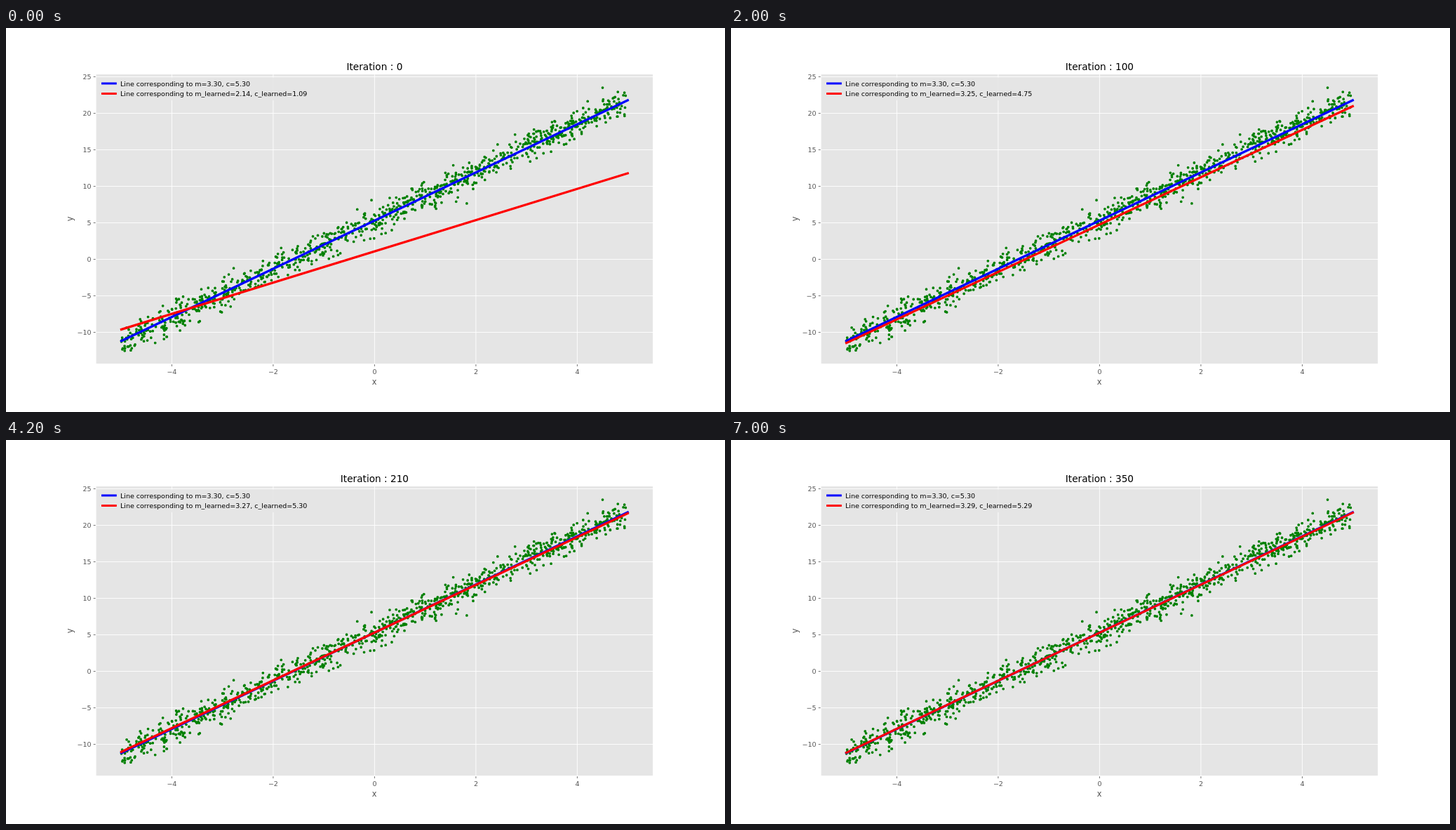
Animation of 1025x547 px, one loop 7200 ms. Source, as an HTML page with a canvas:

```html
<!DOCTYPE html>
<html lang="en">
<head>
<meta charset="utf-8">
<title>Line fit</title>
<style>
  html, body { margin: 0; width: 100%; height: 100%; overflow: hidden; background: #fff; }
  canvas { display: block; }
</style>
</head>
<body>
<canvas id="stage" width="1025" height="547"></canvas>
<script>
const ctx = document.getElementById('stage').getContext('2d');
const STEP = 200, STEPS = 36;
const BOX = { left: 128.1, right: 922.5, top: 65.6, bottom: 478.6 };
const M = 3.3, C = 5.3, LOW = -12.53, HIGH = 23.57, X_MAX = 4.995;
const toX = x => 525.4 + x * 72.25;

// Key fits: iteration, slope, intercept
const fits = [
  [0, 2.14, 1.09], [20, 3.24, 2.5], [60, 3.3, 4.06], [140, 3.19, 5.06],
  [210, 3.27, 5.3], [280, 3.25, 5.24], [350, 3.29, 5.29]
];
const decay = n => [M - 1.16 * Math.exp(-0.17 * n), C - 4.21 * Math.exp(-0.0204 * n)];

// Exponential descent plus the drift interpolated between key fits
function fitAt(n) {
  let i = 0;
  while (i < fits.length - 2 && n > fits[i + 1][0]) i++;
  const a = fits[i], b = fits[i + 1], k = (n - a[0]) / (b[0] - a[0]);
  const da = decay(a[0]), db = decay(b[0]);
  return decay(n).map((v, j) => v + (a[j + 1] - da[j]) * (1 - k) + (b[j + 1] - db[j]) * k);
}

let seed = 7;
function random() {
  seed = (seed * 16807) % 2147483647;
  return seed / 2147483647;
}
const gauss = () => Math.sqrt(-2 * Math.log(random())) * Math.cos(2 * Math.PI * random());

// A few clear strays, then normal noise around the line
const dots = [[4.5, 23.5], [-4.93, LOW], [-0.06, 8.1], [1.61, 7.9], [1.82, 7.65]];
while (dots.length < 1000) {
  const x = (random() * 2 - 1) * X_MAX, noise = gauss(), y = M * x + C + noise;
  if (Math.abs(noise) < 2.7 && y > LOW && y < 23) dots.push([x, y]);
}

function line(x1, y1, x2, y2, color, width, cap = 'butt') {
  ctx.strokeStyle = color;
  ctx.lineWidth = width;
  ctx.lineCap = cap;
  ctx.beginPath();
  ctx.moveTo(x1, y1);
  ctx.lineTo(x2, y2);
  ctx.stroke();
}

function text(str, x, y, size, align, color) {
  ctx.font = size + 'px "DejaVu Sans", sans-serif';
  ctx.textAlign = align;
  ctx.fillStyle = color;
  ctx.fillText(str, x, y);
}

const label = v => String(v).replace('-', '\u2212');

function legendRow(y, color, str) {
  line(137.5, y, 156.3, y, color, 3, 'square');
  text('Line corresponding to ' + str, 163, y + 3.5, 9.5, 'left', '#000');
}

function draw(n) {
  const [m, c] = fitAt(n);
  const low = Math.min(LOW, c - 5 * m), range = HIGH - low;
  const width = BOX.right - BOX.left, height = BOX.bottom - BOX.top;
  const unit = height / (range * 1.1);
  const toY = y => BOX.top + (HIGH + range * 0.05 - y) * unit;

  ctx.fillStyle = '#fff';
  ctx.fillRect(0, 0, 1025, 547);
  ctx.fillStyle = '#e5e5e5';
  ctx.fillRect(BOX.left, BOX.top, width, height);

  for (let v = -4; v <= 4; v += 2) {
    const x = toX(v);
    line(x, BOX.top, x, BOX.bottom, '#fff', 0.9);
    line(x, BOX.bottom, x, BOX.bottom + 3.4, '#555', 0.8);
    text(label(v), x, 493, 9.5, 'center', '#555');
  }
  for (let v = -15; v <= 25; v += 5) {
    const y = toY(v);
    if (y > BOX.bottom) continue;
    line(BOX.left, y, BOX.right, y, '#fff', 0.9);
    line(BOX.left - 3.4, y, BOX.left, y, '#555', 0.8);
    text(label(v), 121.5, y + 3.5, 9.5, 'right', '#555');
  }

  ctx.fillStyle = '#008000';
  ctx.beginPath();
  for (const [x, y] of dots) {
    const px = toX(x), py = toY(y);
    ctx.moveTo(px + 1.9, py);
    ctx.arc(px, py, 1.9, 0, 2 * Math.PI);
  }
  ctx.fill();

  const fitLine = (a, b, color) =>
    line(toX(-X_MAX), toY(b - X_MAX * a), toX(X_MAX), toY(b + X_MAX * a), color, 3.3, 'square');
  fitLine(M, C, '#00f');
  fitLine(m, c, '#f00');

  ctx.strokeStyle = '#fff';
  ctx.lineWidth = 1;
  ctx.strokeRect(BOX.left, BOX.top, width, height);

  ctx.fillStyle = 'rgba(229,229,229,.8)';
  ctx.fillRect(132.9, 70.4, 302, 32.6);
  legendRow(79, '#00f', 'm=3.30, c=5.30');
  legendRow(93.5, '#f00', `m_learned=${m.toFixed(2)}, c_learned=${c.toFixed(2)}`);

  text('Iteration : ' + n, 525.4, 60, 13.67, 'center', '#000');
  text('x', 525.2, 508, 11.4, 'center', '#555');
  ctx.save();
  ctx.translate(95, 272);
  ctx.rotate(-Math.PI / 2);
  text('y', 0, 0, 11.4, 'center', '#555');
  ctx.restore();
}

const start = performance.now();
let shown = -1;
function tick() {
  const step = Math.floor((performance.now() - start) / STEP) % STEPS;
  if (step !== shown) draw(10 * (shown = step));
  requestAnimationFrame(tick);
}
tick();
</script>
</body>
</html>
```
